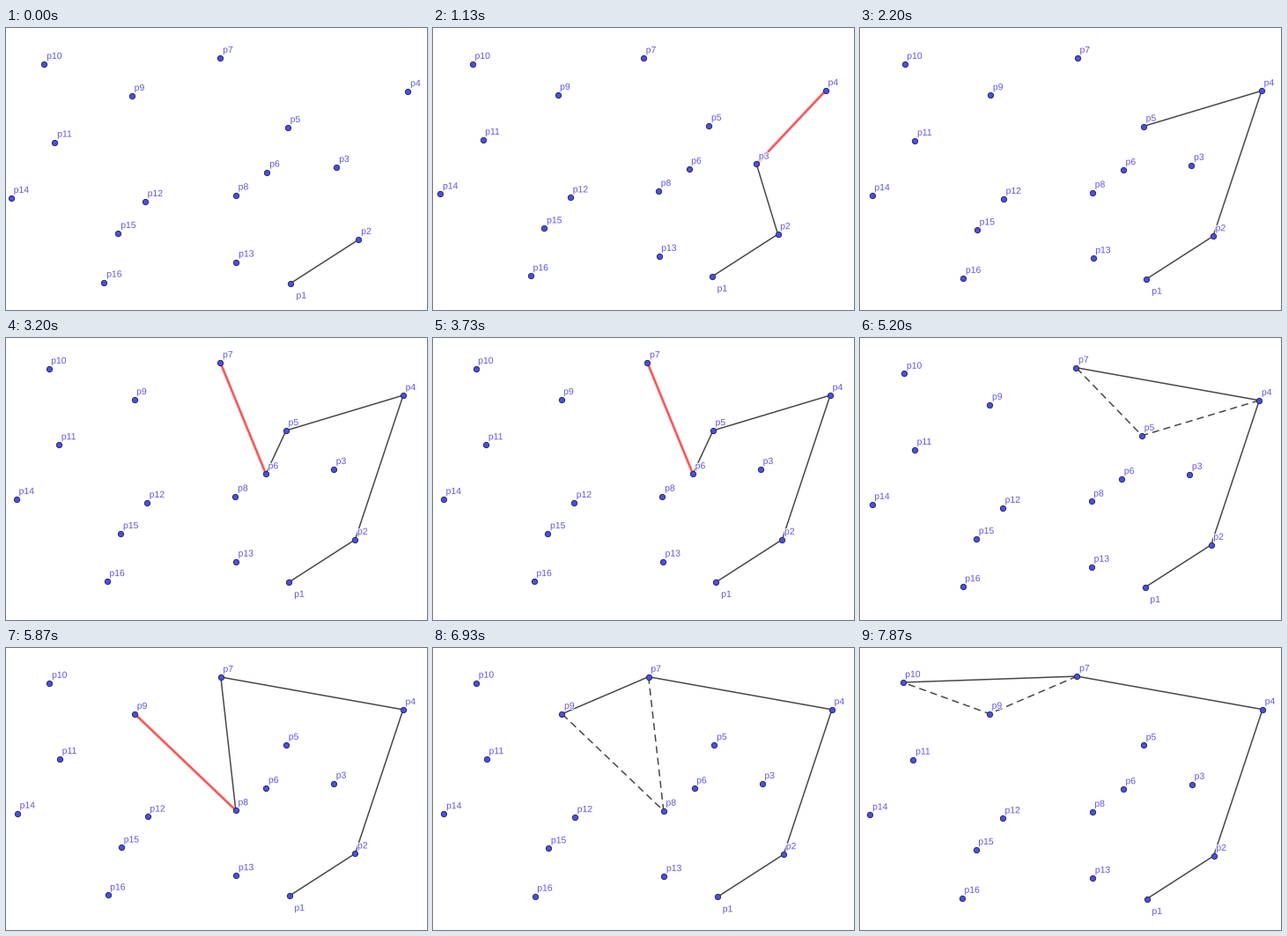
A matplotlib script for the animation above (8 s loop, 478 px wide and 320 px high).

```python
import matplotlib.pyplot as plt
import numpy as np
from matplotlib.animation import FuncAnimation
from matplotlib.patheffects import withStroke

W, H, DPI = 478, 320, 100
PX = 72 / DPI  # points per pixel
LOOP, STEP, STAGES = 8000, 50, 15
INK, RED, BLUE, LABEL = "#464646", "#f04444", "#4d4de8", "#5f56e2"

POINTS = np.array([
    (324, 290), (401, 240.5), (376, 158.5), (457, 72.5),
    (320.5, 113.5), (297, 164), (244, 34.5), (261.5, 190),
    (143.5, 77.5), (44, 41.5), (56, 130), (158.5, 197.5),
    (262, 266), (6.5, 193.5), (128, 233.5), (112, 289),
])
CORNER = POINTS.min(axis=0)

# Key views of the board; stages between them are interpolated
VIEW_STAGE = (0, 2, 4, 6, 8, 11, 14)
SCALE = (1, 0.971, 0.9815, 0.9745, 0.978, 0.972, 0.989)
LEFT = (6, 8.5, 13.8, 12, 14, 13, 11.5)
TOP = (34, 34, 34, 28, 34, 33, 32.1)


def turns_right(a, b, c):
    (ux, uy), (vx, vy) = POINTS[b] - POINTS[a], POINTS[c] - POINTS[b]
    return ux * vy - uy * vx > 0


def graham_scan():
    """Yield (hull path, edge under test, dropped path) for each stage."""
    hull = [0, 1]
    yield hull[:], [], []
    for c in range(2, len(POINTS)):
        popped = False
        while len(hull) > 1 and turns_right(*hull[-2:], c):
            yield hull[:], [hull[-1], c], []
            bad = hull.pop()
            yield hull + [c], [], [hull[-1], bad, c]
            popped = True
        hull.append(c)
        if not popped:
            yield hull[:], [], []


SCAN = [stage for stage, _ in zip(graham_scan(), range(STAGES))]

fig = plt.figure(figsize=(W / DPI, H / DPI), dpi=DPI, facecolor="white")
ax = fig.add_axes([0, 0, 1, 1])
ax.set_xlim(0, W)
ax.set_ylim(H, 0)
ax.axis("off")


def stroke(color, width, **kw):
    return ax.plot([], [], color=color, lw=width * PX, **kw)[0]


hull_line = stroke(INK, 1.5, zorder=2)
dropped_line = stroke(INK, 1.5, zorder=2, dashes=(5.4, 3.4),
                      dash_capstyle="butt")
glow = stroke(RED, 3.8, zorder=3, alpha=0.4)
edge_line = stroke(RED, 1.6, zorder=3)
dots = ax.plot([], [], "o", ms=6.3 * PX, mfc=BLUE, mec="#22224e",
               mew=0.9 * PX, zorder=4)[0]
labels = [
    ax.text(0, 0, f"p{i + 1}", color=LABEL, family="Liberation Sans",
            size=10.4 * PX, va="baseline", zorder=5,
            path_effects=[withStroke(linewidth=2 * PX, foreground="white")])
    for i in range(len(POINTS))
]
offsets = np.tile((2.7, -6.0), (len(POINTS), 1))
offsets[0] = 6, 17.3  # the start point is labelled below


def draw(n):
    k = (n * STEP + STEP // 2) * STAGES // LOOP
    scale, left, top = (np.interp(k, VIEW_STAGE, v) for v in (SCALE, LEFT, TOP))
    pts = (left, top) + scale * (POINTS - CORNER)
    hull, edge, dropped = SCAN[k]
    for line, path in ((hull_line, hull), (glow, edge),
                       (edge_line, edge), (dropped_line, dropped)):
        line.set_data(*pts[np.array(path, dtype=int)].T)
    dots.set_data(*pts.T)
    for label, pos in zip(labels, pts + offsets * scale):
        label.set_position(pos)
    return [hull_line, dropped_line, glow, edge_line, dots, *labels]


anim = FuncAnimation(fig, draw, frames=LOOP // STEP, interval=STEP,
                     repeat=True, repeat_delay=0)
plt.show()
```
